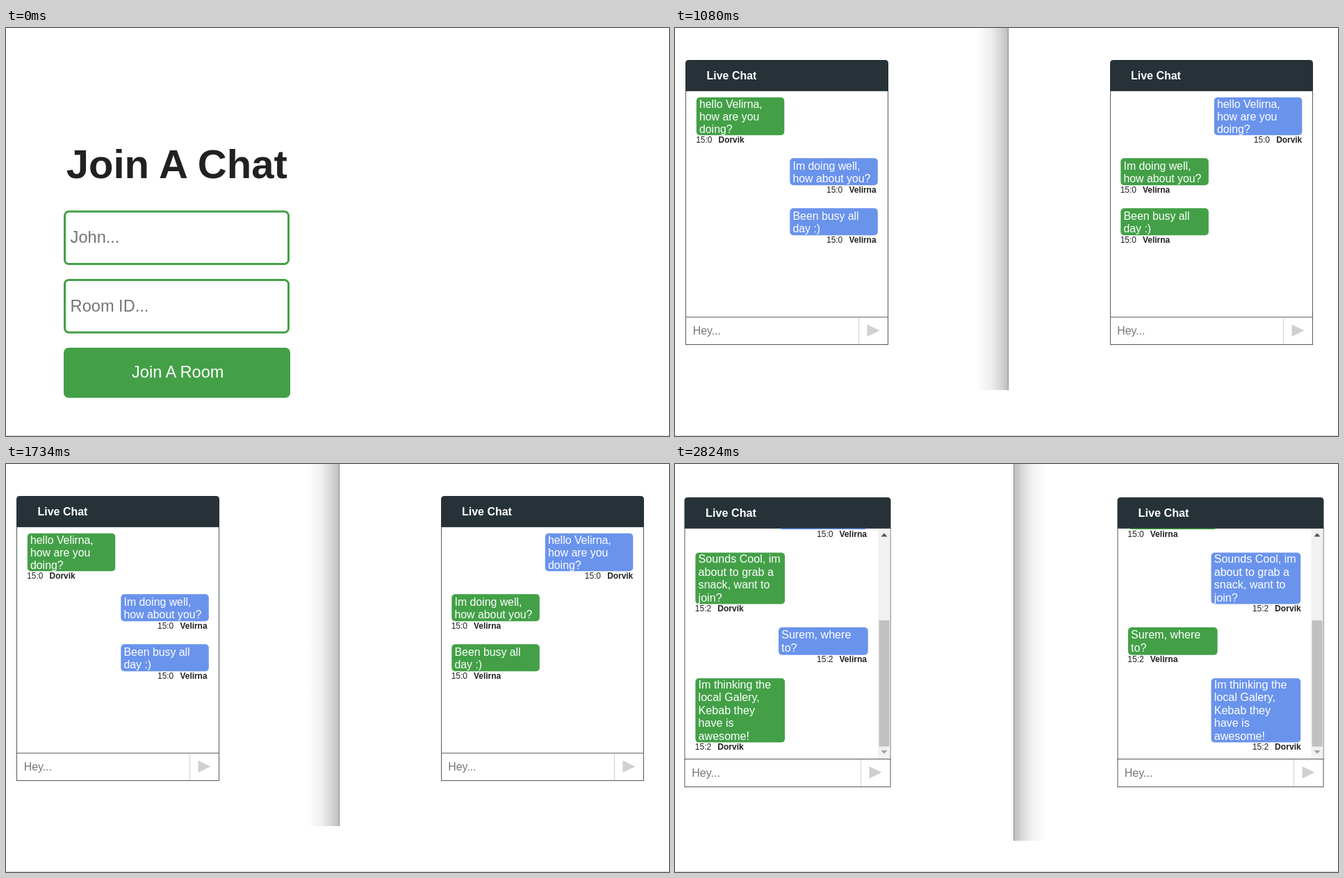
Animation of 954x587 px, one loop 3.26 s. Source, as an HTML page:

```html
<!DOCTYPE html>
<html lang="en">
<head>
<meta charset="utf-8">
<title>Live chat</title>
<style>
  html, body { margin: 0; width: 100%; height: 100%; overflow: hidden; background: #fff; }
  svg { display: block; width: 100%; height: 100%; }
  text { font-family: "Liberation Sans", Arial, sans-serif; white-space: pre; }
</style>
</head>
<body>
<svg id="stage" viewBox="0 0 954 587">
  <defs>
    <linearGradient id="shade">
      <stop offset="0" stop-color="#bdbdbd"/>
      <stop offset=".25" stop-color="#d8d8d8"/>
      <stop offset=".55" stop-color="#f0f0f0"/>
      <stop offset="1" stop-color="#fff"/>
    </linearGradient>
  </defs>
</svg>
<script>
const GREEN = '#43a047', BLUE = '#6a93ec', DARK = '#263238', INK = '#212121', HINT = '#757575';
const ANN = 'Velirna', BOB = 'Dorvik';
const LOOP = 3260, CUTS = [1080, 2170];
const stage = document.getElementById('stage');

function add(parent, tag, attrs, content) {
  const el = document.createElementNS('http://www.w3.org/2000/svg', tag);
  for (const key in attrs) el.setAttribute(key, attrs[key]);
  if (content) el.textContent = content;
  parent.appendChild(el);
  return el;
}

const box = (p, x, y, width, height, fill, rx = 0) =>
  add(p, 'rect', { x, y, width, height, fill, rx });

const label = (p, x, y, size, fill, content, weight = 400) =>
  add(p, 'text', { x, y, fill, 'font-size': size, 'font-weight': weight }, content);

const outline = (p, x, y, width, height, stroke, line, rx = 0) =>
  add(p, 'rect', { x, y, width, height, rx, fill: '#fff', stroke, 'stroke-width': line });

const shape = (p, d, fill) => add(p, 'path', { d, fill });

function drawForm(p) {
  label(p, 86.8, 215.5, 58, INK, 'Join A Chat', 700);
  [['John...', 263], ['Room ID...', 361.5]].forEach(([hint, y]) => {
    outline(p, 84.5, y + 1, 322, 75.5, GREEN, 3, 6);
    label(p, 92.6, y + 46, 23.6, HINT, hint);
  });
  box(p, 83, 460, 326, 72, GREEN, 7);
  label(p, 181, 503.3, 23.6, '#fff', 'Join A Room');
}

// Both users see the same messages, with sides and colours swapped.
function drawMessage(p, v, msg, viewer, dx) {
  const own = msg.by === viewer;
  const x = (own ? v.ownX : v.otherX) + dx;
  const { y, h } = msg;
  const first = y + 14.8 + (msg.lines.length === 2 ? 1.6 : 0);
  box(p, x, y, v.bubble, h, own ? BLUE : GREEN, 5);
  msg.lines.forEach((line, i) => label(p, x + 4.2, first + i * v.leading, v.size, '#fff', line));

  const nameWidth = msg.by === ANN ? 41.5 : 37.3;
  const start = own ? x + v.bubble - nameWidth - 32.2 : x - .6;
  label(p, start, y + h + 10.7, v.small, INK, msg.at);
  label(p, start + 32.4, y + h + 10.7, v.small, INK, msg.by, 700);
}

function drawScroll(p, x) {
  box(p, x, 93, 17, 331, '#f1f1f1');
  box(p, x + 1, 225, 15, 181.5, '#c1c1c1');
  shape(p, `M${x + 4} 104.5l4.5-5 4.5 5z`, '#505050');
  shape(p, `M${x + 4} 412l4.5 5 4.5-5z`, '#a3a3a3');
}

function drawPanel(p, v, viewer, shift) {
  const left = v.x + shift, dx = shift && shift - .5;
  const { top, mid, foot, end, width } = v;
  outline(p, left + .5, mid + .5, width - 1, end - mid - 1, '#50595e', 1);
  v.messages.forEach(msg => drawMessage(p, v, msg, viewer, dx));
  if (v.scroll) drawScroll(p, left + width - 18);
  shape(p, `M${left} ${mid + .5}V${top + 5}q0-5 5-5h${width - 10}q5 0 5 5V${mid + .5}z`, DARK);
  label(p, v.x + 30.6 + dx, top + 27.9, v.size + .1, '#fff', 'Live Chat', 700);

  box(p, left, foot, width, 1, '#50595e');
  box(p, left + v.split, foot + 1, 1, end - foot - 2, '#cfcfcf');
  label(p, v.x + 10.7 + dx, foot + 25.6, v.size, HINT, 'Hey...');
  shape(p, `M${left + v.split + 12.5} ${foot + 11}l18 8.7-18 8.7z`, '#d0d0d0');
}

function drawChat(p, v) {
  const { edge, side, bottom } = v;
  const shadow = box(p, 0, 0, 46, bottom, 'url(#shade)');
  shadow.setAttribute('transform', `translate(${edge + (side > 0 ? 1 : 0)} 0) scale(${side} 1)`);
  box(p, edge, 0, 1, bottom, '#8c8c8c');
  drawPanel(p, v, ANN, 0);
  drawPanel(p, v, BOB, v.shift);
}

const early = {
  x: 15, width: 292, top: 46, mid: 90, foot: 415.5, end: 456, split: 249, shift: 611,
  size: 15.85, small: 11.9, leading: 18, bubble: 126.5, otherX: 30.8, ownX: 165.3,
  edge: 479, side: -1, bottom: 521,
  messages: [
    { by: BOB, at: '15:0', y: 99.8, h: 54.4, lines: [`hello ${ANN},`, 'how are you', 'doing?'] },
    { by: ANN, at: '15:0', y: 187.2, h: 39, lines: ['Im doing well,', 'how about you?'] },
    { by: ANN, at: '15:0', y: 259.2, h: 39, lines: ['Been busy all', 'day :)'] }
  ]
};

const late = {
  x: 13.5, width: 297, top: 48, mid: 92, foot: 424, end: 465, split: 253.5, shift: 623,
  size: 16.1, small: 12.1, leading: 18.4, bubble: 128.7, otherX: 29.4, ownX: 149,
  edge: 487, side: 1, bottom: 542, scroll: true,
  messages: [
    { by: ANN, at: '15:0', y: 54.5, h: 39.5, lines: [] },
    { by: BOB, at: '15:2', y: 127.5, h: 74, lines: ['Sounds Cool, im', 'about to grab a', 'snack, want to', 'join?'] },
    { by: ANN, at: '15:2', y: 235, h: 39.7, lines: ['Surem, where', 'to?'] },
    { by: BOB, at: '15:2', y: 308.2, h: 92.4, lines: ['Im thinking the', 'local Galery,', 'Kebab they', 'have is', 'awesome!'] }
  ]
};

const scenes = [0, 1, 2].map(() => add(stage, 'g', {}));
drawForm(scenes[0]);
drawChat(scenes[1], early);
drawChat(scenes[2], late);
box(stage, 0, 586, 954, 1, '#d4d4d4');

function render(now) {
  const t = now % LOOP;
  const current = CUTS.filter(cut => t >= cut).length;
  scenes.forEach((g, i) => g.setAttribute('display', i === current ? 'inline' : 'none'));
}

const began = performance.now();
function tick() {
  render(performance.now() - began);
  requestAnimationFrame(tick);
}
tick();
</script>
</body>
</html>
```
